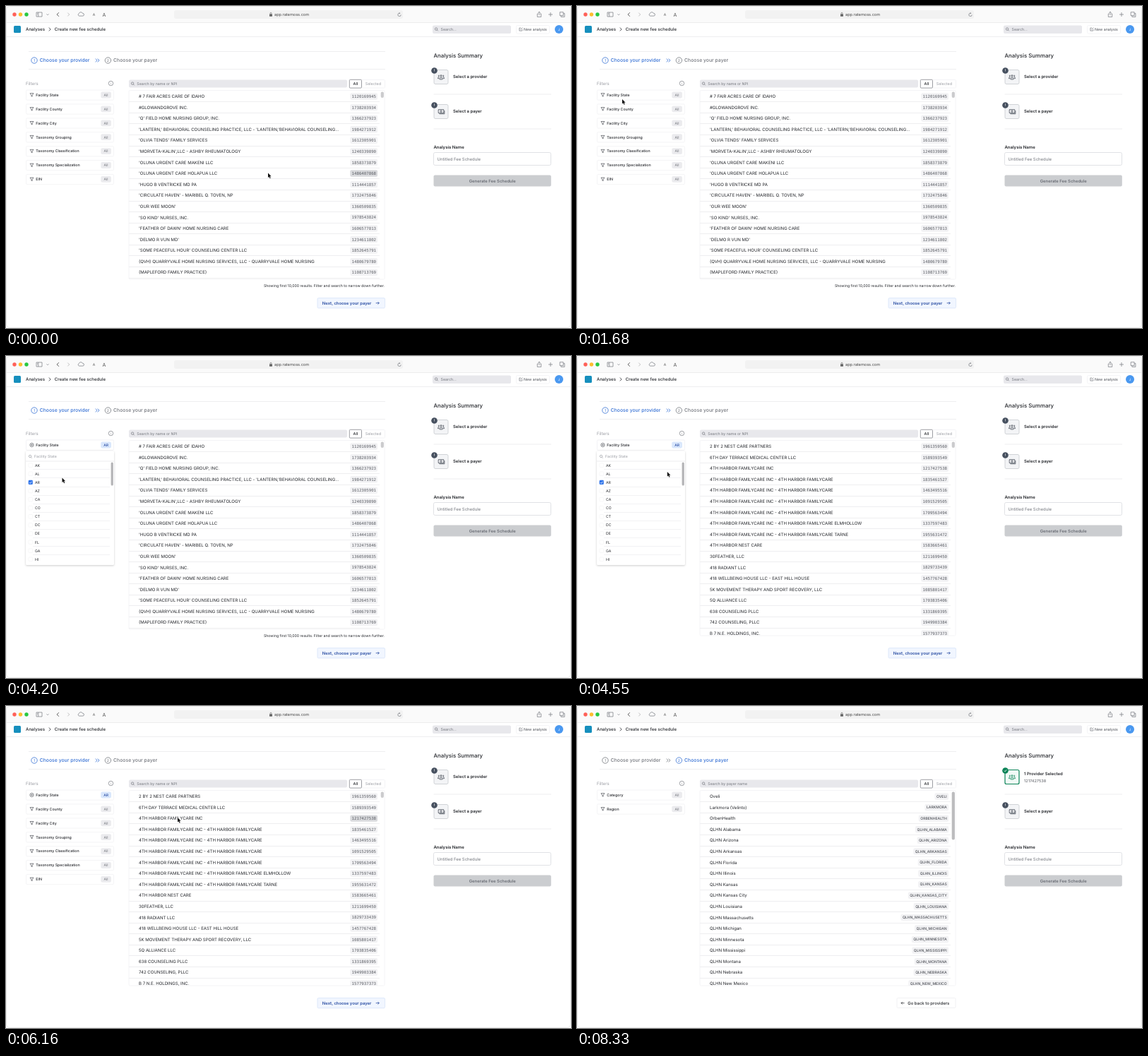
An HTML page with a canvas that plays this animation: 800x456 px, repeating every 8960 ms.

```html
<!DOCTYPE html>
<html lang="en">
<head>
<meta charset="utf-8">
<title>New fee schedule</title>
<style>
html, body { margin: 0; width: 100%; height: 100%; overflow: hidden; background: #fff; }
canvas { display: block; }
</style>
</head>
<body>
<canvas id="stage" width="800" height="456"></canvas>
<script>
const ctx = document.getElementById('stage').getContext('2d');
const LOOP = 8960, STEP = 70;
const INK = '#24262b', GRAY = '#73767d', FAINT = '#9a9ca3', RULE = '#eeeef0', EDGE = '#f2f2f4', FIELD = '#e8e8ec';
const BLUE = '#3570d4', NAVY = '#2c4fa3', PALE = '#d9e7fc', GREEN = '#0d8458';
const SANS = 'Inter, sans-serif', MONO = '"DejaVu Sans Mono", monospace';

// Moments at which the interface changes, in ms
const OPEN = 2380, CHECK = 3500, FILTERED = 4550, CLOSE = 5670, PICK = 6510, PICKED = 6720, NEXT = 7700, LOADED = 8190;

const PROVIDERS = [
  '# 7 FAIR ACRES CARE OF IDAHO', '#GLOWANDGROVE INC.', "'Q' FIELD HOME NURSING GROUP, INC.",
  "'LANTERN,' BEHAVIORAL COUNSELING PRACTICE, LLC - 'LANTERN,'BEHAVIORAL COUNSELING...",
  "'OLVIA TENDS' FAMILY SERVICES", "'MORVETA-KALIN',LLC - ASHBY RHEUMATOLOGY",
  "'OLUNA URGENT CARE MAKENI LLC", "'OLUNA URGENT CARE HOLAPUA LLC", "'HUGO B VENTRICKE MD PA",
  "'CIRCULATE HAVEN' - MARIBEL Q. TOVEN, NP", "'OUR WEE MOON'", "'SO KIND' NURSES, INC.",
  "'FEATHER OF DAWN' HOME NURSING CARE", "'DELMO R VUN MD'", "'SOME PEACEFUL HOUR' COUNSELING CENTER LLC",
  '(QVH) QUARRYVALE HOME NURSING SERVICES, LLC - QUARRYVALE HOME NURSING', '(MAPLEFORD FAMILY PRACTICE)'];
const GROUP = '4TH HARBOR FAMILYCARE INC', BRANCH = GROUP + ' - 4TH HARBOR FAMILYCARE';
const MATCHES = [
  '2 BY 2 NEST CARE PARTNERS', '6TH DAY TERRACE MEDICAL CENTER LLC', GROUP, BRANCH, BRANCH, BRANCH, BRANCH,
  BRANCH + ' ELMHOLLOW', BRANCH + ' TARNE', '4TH HARBOR NEST CARE', '30FEATHER, LLC', '418 RADIANT LLC',
  '418 WELLBEING HOUSE LLC - EAST HILL HOUSE', '5K MOVEMENT THERAPY AND SPORT RECOVERY, LLC', '5Q ALLIANCE LLC',
  '638 COUNSELING PLLC', '742 COUNSELING, PLLC', 'B 7 N.E. HOLDINGS, INC.'];
const PAYERS = ['Oveli', 'Larkmora (Velinto)', 'OrbenHealth', ...('Alabama,Arizona,Arkansas,Florida,Illinois,Kansas,' +
  'Kansas City,Louisiana,Massachusetts,Michigan,Minnesota,Mississippi,Montana,Nebraska,New Mexico')
  .split(',').map(state => 'QLHN ' + state)];
const FILTERS = ['Facility State', 'Facility County', 'Facility City', 'Taxonomy Grouping',
  'Taxonomy Classification', 'Taxonomy Specialization', 'EIN'];
const STATES = 'AK AL AR AZ CA CO CT DC DE FL GA HI'.split(' ');

// Pointer track: time, x, y
const TRACK = [[70, 371, 236.5], [1260, 84, 140], [1680, 64, 132], [2240, 58, 127], [2730, 58, 128], [3080, 54, 167.5],
  [3220, 54, 167.5], [3500, 45, 178], [3780, 45, 178], [4060, 78, 173], [4200, 79.5, 172.5], [5040, 208, 150],
  [5320, 239, 145.5], [5530, 243, 158], [6720, 243, 158], [7210, 499.5, 418.5]];

const ICONS = {
  funnel: 'M-2.5 -2.3H2.5L.6 .3V2.2L-.6 1.7V.3Z',
  target: 'M2.6 0A2.6 2.6 0 1 1 -2.6 0A2.6 2.6 0 1 1 2.6 0M-1.2 0H1.2M0 -1.2V1.2',
  search: 'M1.3 -.4A1.7 1.7 0 1 1 -2.1 -.4A1.7 1.7 0 1 1 1.3 -.4M.9 .9L2.3 2.3',
  check: 'M-1.6 .1L-.4 1.3L1.7 -1.2',
  right: 'M-1.2 -2.4L1.2 0L-1.2 2.4',
  left: 'M1.4 -2.8L-1.4 0L1.4 2.8',
  down: 'M-1.5 -.7L0 .8L1.5 -.7',
  arrow: 'M-2.3 0H2.3M.5 -1.8L2.3 0L.5 1.8',
  back: 'M2.3 0H-2.3M-.5 -1.8L-2.3 0L-.5 1.8',
  sidebar: 'M-4 -3H4V3H-4ZM-1.2 -3V3M-3 -1.4H-2.2M-3 0H-2.2',
  cloud: 'M-2.4 2.6A1.9 1.9 0 0 1 -2.6 -1A2.7 2.7 0 0 1 2.4 -1.2A1.9 1.9 0 0 1 2.7 2.6Z',
  reload: 'M2.2 .2A2.2 2.2 0 1 1 .8 -2L.1 -3M.8 -2L-.3 -1.2',
  share: 'M-1.2 -1H-2.7V3.4H2.7V-1H1.2M0 1.2V-3.8M-1.5 -2.4L0 -3.9L1.5 -2.4',
  plus: 'M-3 0H3M0 -3V3',
  tabs: 'M-3.3 -3.3H1.6V1.6H-3.3ZM-1.6 1.8V3.4H3.4V-1.6H1.8',
  pencil: 'M.2 -1.9H-2.1V2.1H1.9V0M-.6 .6L2.4 -2.4',
  people: 'M1.2 -1.6A1.2 1.2 0 1 1 -1.2 -1.6A1.2 1.2 0 1 1 1.2 -1.6M-2 3.4V1.9Q0 -.2 2 1.9V3.4ZM-2.4 -2.3A1 1 0 1 0 -2.6 -.4' +
    'M2.4 -2.3A1 1 0 1 1 2.6 -.4M-2.8 2.2H-4.4V1Q-3.6 .2 -2.6 .6M2.8 2.2H4.4V1Q3.6 .2 2.6 .6',
  money: 'M-3.8 -2.8H3.8V2H-3.8ZM1.2 -.4A1.2 1.2 0 1 1 -1.2 -.4A1.2 1.2 0 1 1 1.2 -.4M-2.6 3.3H4.8V-1.4',
};

function text(s, x, y, size, color = INK, weight = 400, align = 'left', family = SANS) {
  ctx.font = `${weight} ${size}px ${family}`;
  ctx.textAlign = align;
  ctx.fillStyle = color;
  ctx.fillText(s, x, y + size * .36);
}

function box(x, y, w, h, r, fill, stroke, width = .8) {
  ctx.beginPath();
  ctx.roundRect(x, y, w, h, r);
  paint(fill, stroke, width);
}

function disc(x, y, r, fill, stroke, width = .8) {
  ctx.beginPath();
  ctx.arc(x, y, r, 0, 7);
  paint(fill, stroke, width);
}

function paint(fill, stroke, width) {
  if (fill) { ctx.fillStyle = fill; ctx.fill(); }
  if (stroke) { ctx.strokeStyle = stroke; ctx.lineWidth = width; ctx.stroke(); }
}

function rule(x1, x2, y, color = RULE) {
  ctx.fillStyle = color;
  ctx.fillRect(x1, y, x2 - x1, 1);
}

function icon(name, x, y, color = GRAY, width = .7) {
  ctx.save();
  ctx.translate(x, y);
  ctx.strokeStyle = color;
  ctx.lineWidth = width;
  ctx.stroke(new Path2D(ICONS[name]));
  ctx.restore();
}

const providerId = n => String(1000000000 + n * 618033989 % 990000000);

function pointerAt(t) {
  const next = TRACK.findIndex(key => key[0] > t);
  if (next < 1) return TRACK.at(next).slice(1);
  const [t0, x0, y0] = TRACK[next - 1], [t1, x1, y1] = TRACK[next];
  const u = (t - t0) / (t1 - t0), k = u * u * (3 - 2 * u);
  return [x0 + (x1 - x0) * k, y0 + (y1 - y0) * k];
}

function drawBrowser() {
  box(0, 0, 800, 456, 0, '#fff');
  box(0, 0, 800, 23, 0, '#fafafa');
  rule(0, 800, 23, '#ededed');
  ['#ff5f57', '#febc2e', '#28c840'].forEach((c, i) => disc(12 + i * 8.5, 12, 2.7, c));
  icon('sidebar', 47, 12);
  icon('down', 59, 12);
  icon('left', 73.5, 12, '#555', .9);
  icon('right', 88.5, 12, '#bbb', .9);
  icon('cloud', 106, 11.5);
  text('A', 124.5, 12, 5, '#555', 400, 'center');
  text('A', 139, 12, 7, '#555', 400, 'center');
  box(238, 6, 324, 12, 3, '#f2f2f2');
  box(373, 11.5, 4, 3.2, .5, '#666');
  box(374, 9.3, 2, 3, 1, null, '#666', .6);
  text('app.ratemoss.com', 380, 12, 5.6, '#444');
  icon('reload', 557, 12.3);
  icon('share', 755, 12);
  icon('plus', 771, 12);
  icon('tabs', 787.5, 12);
}

function drawHeader() {
  box(11, 28, 10, 10, 1.5, '#168fbd');
  text('Analyses', 28, 33, 6.2, INK, 500);
  icon('right', 62, 33, INK, .8);
  text('Create new fee schedule', 68.7, 33, 6.1, INK, 500);
  box(604, 27.5, 111, 11.5, 2, FIELD);
  icon('search', 609.5, 33);
  text('Search...', 615.5, 33, 5.3, GRAY);
  box(722.5, 27.5, 47, 11.5, 2, '#fff', EDGE);
  icon('pencil', 729, 33);
  text('New analysis', 733, 33, 5.25, '#4a4d54');
  disc(783, 33, 6, '#4a98f0');
  text('J', 783, 33, 4.6, '#fff', 400, 'center');
  rule(0, 800, 43);
}

function drawStepper(second) {
  rule(32, 537, 64);
  rule(32, 537, 89);
  const step = (n, x, label, active) => {
    const color = active ? BLUE : GRAY;
    disc(x, 77, 4.2, null, color, .8);
    text(n, x, 77, 5.2, color, 400, 'center');
    text(label, x + 7.7, 77, 6.85, color, 500);
  };
  step(1, 40, 'Choose your provider', !second);
  step(2, 144.4, 'Choose your payer', second);
  icon('right', 128, 77, second ? GRAY : BLUE, .8);
  icon('right', 130.8, 77, second ? GRAY : BLUE, .8);
}

function drawFilter(label, y, chosen) {
  box(28.5, y - 7, 124, 14.2, 1.5, '#fff', EDGE);
  icon(chosen ? 'target' : 'funnel', 36.5, y, '#4a4d54');
  text(label, 42.3, y, 5.25, INK, 500);
  box(134.3, y - 4.4, 14.6, 8.8, 2, chosen ? PALE : '#ebebee');
  text(chosen || 'All', 141.6, y, 5.1, chosen ? NAVY : GRAY, chosen ? 500 : 400, 'center');
}

function drawDropdown(checked) {
  drawFilter(FILTERS[0], 126, checked && 'AR');
  ctx.save();
  ctx.shadowColor = 'rgba(0,0,0,.2)';
  ctx.shadowBlur = 3;
  ctx.shadowOffsetY = 1;
  box(28, 134.5, 125, 161.5, 1.5, '#fff');
  ctx.restore();
  icon('search', 34.5, 142.4, FAINT);
  text('Facility State', 40, 142.3, 5.25, FAINT);
  if (!checked) box(39.6, 139.2, .6, 6.2, 0, INK);
  rule(28, 153, 148.5, checked ? RULE : '#4f86e0');
  STATES.forEach((state, i) => {
    const y = 154.8 + i * 12.1, on = checked && state === 'AR';
    box(32, y - 2.9, 5.6, 5.6, 1, on ? '#2f74ea' : '#fff', on ? '#2f74ea' : EDGE, .6);
    if (on) icon('check', 34.8, y, '#fff', .8);
    text(state, 41, y, 5.2);
    if (i < 11) rule(38, 147, Math.round(y + 5.5), EDGE);
  });
  box(148.6, 150.5, 3.2, 33, 1.6, '#b4b4b6');
}

function drawPanel(t, [px, py]) {
  const second = t >= NEXT, filtered = t >= FILTERED, covered = t >= OPEN && t < CLOSE;
  box(174, 104.5, 309, 11, 2, FIELD);
  icon('search', 179.5, 110);
  text(second ? 'Search by payer name' : 'Search by name or NPI', 185.3, 110, 5.25, GRAY);
  box(503.5, 104.5, 33, 11.5, 1, '#fff', EDGE);
  box(486.3, 104.3, 17.2, 11.8, 1.2, '#fff', '#84878d');
  text('All', 494.9, 110.2, 5.5, INK, 500, 'center');
  text('Selected', 508.7, 110.2, 5.4, FAINT);

  const bottom = filtered ? 396 : 387;
  box(174, 119.5, 362, bottom - 119.5, 1.5, null, EDGE);
  const rows = second ? (t >= LOADED ? PAYERS : []) : filtered ? MATCHES : PROVIDERS;
  const hover = covered || second || px < 174 || px > 530 ? -1 : Math.round((py - 128) / 15.58);
  ctx.save();
  ctx.beginPath();
  ctx.rect(173, 119, 364, bottom - 119);
  ctx.clip();
  rows.forEach((name, i) => {
    const y = 128 + i * 15.58, picked = !second && i === 2 && t >= PICK;
    text(name, 188, y, 6.05, picked ? NAVY : INK);
    if (picked && t >= PICKED) {
      disc(181, y, 2.7, null, NAVY, .7);
      icon('check', 181, y, NAVY, .7);
    }
    if (second) {
      const code = name.replace(/ \(.*/, '').replace(/ /g, '_').toUpperCase();
      ctx.font = `500 5.1px ${SANS}`;
      const w = ctx.measureText(code).width;
      box(521.2 - w, y - 4.7, w + 5, 9.4, 2, '#f2f2f4');
      text(code, 523.7, y, 5.1, '#4d5057', 500, 'right');
    } else {
      box(487.3, y - 4.7, 38.8, 9.4, 2, picked ? '#b5d0f7' : i === hover ? '#d9dadd' : '#f2f2f4');
      text(providerId(i + (filtered ? 40 : 5)), 506.8, y, 5.72, picked ? NAVY : '#5b5e65', 400, 'center', MONO);
    }
    rule(174, 529, Math.round(y + 7.3));
  });
  ctx.restore();
  if (rows.length) box(530.7, 121.5, 4.2, second ? 68 : 8.5, 2, second ? '#bcbcbe' : '#cbcbcd');
  if (!filtered) text('Showing first 10,000 results. Filter and search to narrow down further.', 536, 396, 5.2, INK, 400, 'right');

  if (second) {
    box(453, 413.5, 83, 14, 1.5, '#fff', RULE);
    icon('back', 461.3, 420.7, INK);
    text('Go back to providers', 468.2, 420.7, 5.95, INK, 500);
  } else {
    const over = py > 412 && px > 440;
    box(441, 413.5, 95.5, 14.3, 1.5, over ? '#e9f1fe' : '#f1f6ff', over ? '#a9c4ee' : '#d9e5f9');
    text('Next, choose your payer', 447.8, 420.7, 5.9, NAVY, 600);
    icon('arrow', 526, 420.7, NAVY, .8);
  }
}

function drawSummary(done) {
  text('Analysis Summary', 605.5, 70.5, 7.85, INK, 500);
  const item = (y, glyph, ok) => {
    box(606, y - 10, 20, 20, 2, ok ? '#f1faf6' : '#f3f4f6', ok ? GREEN : '#c6c9cf', ok ? 1.2 : .8);
    icon(glyph, 616, y, ok ? GREEN : '#454b56', .8);
    disc(606.5, y - 9, 4.3, ok ? GREEN : '#46505f');
    if (ok) icon('check', 606.5, y - 9, '#fff', .9);
    else text('!', 606.5, y - 9, 5, '#fff', 600, 'center');
  };
  item(100.5, 'people', done);
  item(149.5, 'money', false);
  text(done ? '1 Provider Selected' : 'Select a provider', 633, done ? 95.7 : 100.2, 5.95, INK, 600);
  if (done) text(providerId(42), 633, 106, 5.6, '#55585f');
  text('Select a payer', 633, 149.2, 5.95, INK, 600);
  rule(605.5, 772, 124.5);
  rule(605.5, 772, 173.5);
  text('Analysis Name', 605.5, 199.5, 6, INK, 600);
  box(605.5, 207.5, 166, 18, 2, '#fff', '#d9dbdf');
  text('Untitled Fee Schedule', 610.5, 216.5, 5.95, GRAY);
  box(605.5, 239.5, 166.3, 16, 2, '#cbcdd0');
  text('Generate Fee Schedule', 688.7, 247.5, 5.9, '#6b6e76', 600, 'center');
}

function drawPointer([x, y]) {
  const hand = y > 412;
  const shape = new Path2D(hand
    ? 'M-.8 4V.6Q0 -.6 .8 .6V2.8L3.6 3.5Q4.1 5.5 3.2 8H-.8L-2.8 5Q-2.4 4 -.8 5Z'
    : 'M0 0V6.6L1.5 5.2L2.6 7.7L3.7 7.2L2.6 4.8H4.6Z');
  ctx.save();
  ctx.translate(x, y);
  ctx.lineWidth = hand ? .8 : 1;
  ctx.strokeStyle = hand ? '#222' : '#fff';
  ctx.fillStyle = hand ? '#fff' : '#111';
  ctx.stroke(shape);
  ctx.fill(shape);
  ctx.restore();
}

function draw(t) {
  const pointer = pointerAt(t), second = t >= NEXT;
  ctx.textRendering = 'geometricPrecision';
  drawBrowser();
  drawHeader();
  drawStepper(second);
  text('Filters', 28, 110.3, 6.1, FAINT);
  disc(148.5, 109.5, 3.2, null, GRAY, .7);
  text('i', 148.5, 109.5, 4.4, GRAY, 400, 'center');
  (second ? ['Category', 'Region'] : FILTERS).forEach((label, i) =>
    drawFilter(label, 126 + i * 19.9, !second && i === 0 && t >= CHECK && 'AR'));
  drawPanel(t, pointer);
  drawSummary(t >= PICKED);
  if (t >= OPEN && t < CLOSE) drawDropdown(t >= CHECK);
  if (t < LOADED) drawPointer(pointer);
  box(.5, .5, 799, 455, 5, null, '#ebebeb', 1);
}

function tick(now) {
  draw(Math.floor(now % LOOP / STEP) * STEP);
  requestAnimationFrame(tick);
}
requestAnimationFrame(tick);
</script>
</body>
</html>
```
